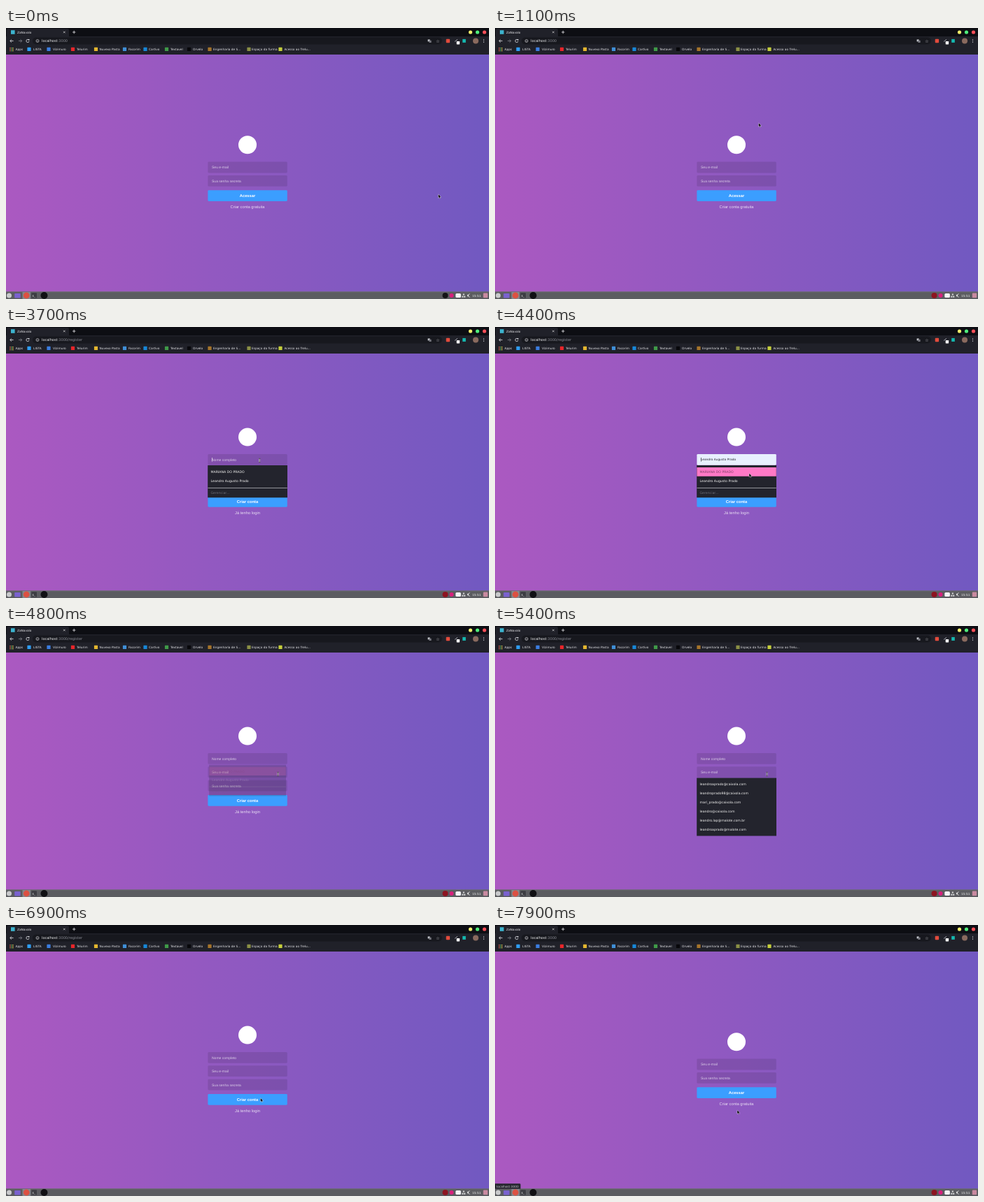
An HTML page with a canvas that plays this animation: 690 by 388 pixels, repeating every 8000 ms.

```html
<!DOCTYPE html>
<html lang="pt-BR">
<head>
<meta charset="utf-8">
<title>Login</title>
<style>
html, body { margin: 0; width: 100%; height: 100%; overflow: hidden; background: #8d59c1; }
canvas { display: block; }
</style>
</head>
<body>
<canvas id="stage" width="690" height="388"></canvas>
<script>
const ctx = document.getElementById('stage').getContext('2d');
const UI = '"DejaVu Sans", sans-serif', PAGE = '"Liberation Sans", Arial, sans-serif';
const LOOP = 8000, STEP = 100;
const REGISTER_AT = 2900, LOGIN_AT = 7800;
const FIELD = { x: 288.4, w: 113.4, h: 15.8, gap: 19.4 };
const PERSON = 'Leandro Augusto Prado';
const EMAILS = ['leandroaprado@caixola.com', 'leandroprado98@caixola.com', 'mari_prado@caixola.com',
  'leandro@caixola.com', 'leandro.lap@malote.com.br', 'leandroaprado@malote.com'];

// time, x, y of the pointer's centre
const PATH = [[0, 619, 241], [200, 619, 241], [1100, 378, 139], [1600, 352, 165], [2500, 356.5, 261],
  [3000, 356.5, 261], [3600, 362, 191], [4000, 364, 191], [4200, 365, 220], [4400, 364.5, 212.5],
  [4700, 388.5, 212], [5500, 388.5, 212], [5700, 388, 228], [6300, 388, 228], [7400, 347.5, 268], [8000, 347.5, 268]];

const BOOKMARKS = [[33, 39, 'LISTA', '#2f9df4'], [61, 67, 'Vizimuro', '#3b7de0'], [95.5, 101, 'Telurim', '#e8262a'],
  [128.5, 133.5, 'Nuvexo Pasta', '#e3b62f'], [169.5, 175, 'Facorim', '#3f8fd8'], [199, 204, 'Cartivo', '#1787d8'],
  [229.5, 235, 'Textavel', '#3f9a48'], [261.5, 267, 'Orvelo', '#08080b'], [291, 296, 'Engenharia de S...', '#a5742b'],
  [347, 351, 'Espaço da Turma', '#8a8f45'], [392, 397.5, 'Acesso ao Trelu...', '#c6cf3c']];

function box(x, y, w, h, color, r = 0) {
  ctx.fillStyle = color;
  ctx.beginPath();
  ctx.roundRect(x, y, w, h, r);
  ctx.fill();
}
function dot(x, y, r, color) {
  ctx.fillStyle = color;
  ctx.beginPath();
  ctx.arc(x, y, r, 0, 7);
  ctx.fill();
}
function line(points, color = '#e4e4e8', width = 0.8) {
  ctx.strokeStyle = color;
  ctx.lineWidth = width;
  ctx.beginPath();
  points.forEach(p => ctx.lineTo(...p));
  ctx.stroke();
}
function text(str, x, y, size, color, font = UI, align = 'left', weight = '') {
  ctx.font = `${weight} ${size}px ${font}`;
  ctx.textAlign = align;
  ctx.fillStyle = color;
  ctx.fillText(str, x, y + size * 0.36);
}

function pointerAt(t) {
  const i = PATH.findIndex((p, n) => n && t <= p[0]);
  const [t0, x0, y0] = PATH[i - 1], [t1, x1, y1] = PATH[i];
  const k = (t - t0) / (t1 - t0), e = k * k * (3 - 2 * k);
  return { x: x0 + (x1 - x0) * e, y: y0 + (y1 - y0) * e };
}
function over(p, x, y, w, h) {
  return p.x >= x && p.x <= x + w && p.y >= y && p.y <= y + h;
}

function drawBrowser(registering) {
  box(0, 0, 690, 38, '#202129');
  box(0, 0, 690, 12, '#0d0e13');
  box(1, 1, 89, 12, '#202129', [2, 2, 0, 0]);
  box(7, 3.2, 5.6, 5.6, '#3db4cf');
  text('ZaNavalo', 16, 6, 4.31, '#e8e8ec');
  line([[82, 4.7], [84.6, 7.3]], '#ddd', 0.7);
  line([[84.6, 4.7], [82, 7.3]], '#ddd', 0.7);
  line([[95, 6], [99.4, 6]]);
  line([[97.2, 3.8], [97.2, 8.2]]);
  ['#f7f36b', '#4ff07b', '#ff4f58'].forEach((c, i) => dot(663.5 + i * 10, 6, 2.6, c));

  line([[10.6, 18.5], [6, 18.5]]);
  line([[8, 16.3], [5.8, 18.5], [8, 20.7]]);
  line([[18, 18.5], [22.6, 18.5]], '#85868e');
  line([[20.6, 16.3], [22.8, 18.5], [20.6, 20.7]], '#85868e');
  ctx.strokeStyle = '#e4e4e8';
  ctx.beginPath();
  ctx.arc(31, 18.5, 2.1, 0.2, 5.4);
  ctx.stroke();
  box(31.8, 16, 1.6, 1.6, '#e4e4e8');

  box(38, 13.5, 585, 10, '#17181e', 5);
  ctx.lineWidth = 0.6;
  ctx.beginPath();
  ctx.arc(45, 18.5, 2, 0, 7);
  ctx.stroke();
  line([[45, 18], [45, 19.6]], '#e4e4e8', 0.6);
  text('localhost', 51, 18.5, 5.03, '#f2f2f4');
  text(':3000' + (registering ? '/register' : ''), 73.6, 18.5, 5.03, '#8c8d96');

  box(602.6, 16.4, 3, 3, '#c9cad0');
  box(604.4, 17.8, 3.2, 3.2, '#75767e');
  text('☆', 617, 18.4, 6, '#d8d8dd', UI, 'center');
  box(628.7, 15.8, 5.4, 5.4, '#e24b3c', 1);
  line([[641, 19.5], [645, 16.3]], '#9ea0a8', 1);
  box(643.7, 19, 4.4, 4.4, '#fff', 0.6);
  box(652.2, 15.9, 4.6, 5, '#15b9b0');
  dot(671, 18.5, 4, '#8a6a5e');
  [-2, 0, 2].forEach(d => dot(682.5, 18.5 + d, 0.6, '#e4e4e8'));

  for (let i = 0; i < 9; i++)
    box(5.3 + i % 3 * 2, 28 + Math.floor(i / 3) * 2, 1.3, 1.3, ['#e8584c', '#52b36a', '#e4c14b'][i % 3]);
  text('Apps', 13.5, 30.5, 4.31, '#e4e4e8');
  for (const [icon, x, label, color] of BOOKMARKS) {
    box(icon - 2.6, 27.8, 5.2, 5.2, color, 0.6);
    text(label, x, 30.5, 4.31, '#e4e4e8');
  }
}

function drawTaskbar(recording) {
  box(0, 377.5, 690, 10.5, '#5b5c60');
  box(0, 377.5, 690, 0.7, '#707175');
  dot(4.5, 383, 3.5, '#c9cacc');
  box(12.2, 380, 8.5, 6.5, '#7a62cf', 0.8);
  box(23.5, 378, 11.5, 10, '#85868a');
  dot(29.2, 383, 4.4, '#dc5142');
  box(36.5, 379.2, 7.5, 7.5, '#3c3d42', 0.8);
  text('$_', 37.5, 383.3, 4, '#e6e6e6');
  dot(54.5, 383, 5, '#101013');
  dot(627.5, 383, 4, recording ? '#8d1420' : '#141416');
  dot(636.5, 383, 3, '#d8207c');
  box(642.3, 380, 7.6, 6, '#f4f4f6', 1.5);
  box(652.8, 380.5, 2, 2, '#ddd');
  box(651.4, 383.7, 2, 2, '#ddd');
  box(654.2, 383.7, 2, 2, '#ddd');
  box(659, 381.8, 1.6, 2.4, '#ddd');
  line([[662.6, 380.6], [660.6, 381.8], [660.6, 384.2], [662.6, 385.4]], '#ddd', 0.9);
  text('15:51', 666, 383, 4.31, '#f0f0f0');
  box(681.8, 379.6, 6.4, 6.6, '#c98aa0', 0.8);
}

function drawForm(t, pointer, registering) {
  const labels = ['Seu e-mail', 'Sua senha secreta'];
  if (registering) labels.unshift('Nome completo');
  const top = registering ? 181.9 : 191.6;
  const preview = registering && t >= 4200 && t < 4750;
  dot(345, top - 24.3, 13, '#fff');
  labels.forEach((label, i) => {
    const y = top + i * FIELD.gap, filled = preview && i === 0;
    box(FIELD.x, y, FIELD.w, FIELD.h, filled ? '#e8f0fe' : 'rgba(0,0,0,.1)', 1.4);
    if (filled) text(PERSON, 294, y + 8, 4.31, '#22242c');
    else text(label, 294, y + 8, 5.03, 'rgba(255,255,255,.7)', PAGE);
  });
  if (registering && t >= 3700 && t < 4700) box(294, top + 5.2, 0.6, 5.6, preview ? '#222' : '#fff');

  const buttonY = top + labels.length * FIELD.gap + 1.8;
  const [button, link, half] = registering ? ['Criar conta', 'Já tenho login', 18] : ['Acessar', 'Criar conta gratuita', 25];
  box(FIELD.x, buttonY, FIELD.w, FIELD.h, '#3b9eff', 1.4);
  text(button, 345, buttonY + 7.8, 5.75, '#fff', PAGE, 'center', 'bold');
  const hover = over(pointer, 345 - half, buttonY + 20.5, half * 2, 8.8);
  text(link, 345, buttonY + 24.1, 5.75, hover ? '#fff' : 'rgba(255,255,255,.8)', PAGE, 'center');
}

// Popup that shrinks a little while it fades out.
function popup(t, open, close, y, h, paint) {
  if (t < open || t >= close + 125) return;
  const p = Math.max(0, (t - close) / 125), s = 1 - 0.035 * Math.min(1, 2 * p);
  ctx.save();
  ctx.globalAlpha = 1 - p;
  ctx.translate(345, y + h / 2);
  ctx.scale(s, s);
  ctx.translate(-345, -y - h / 2);
  box(FIELD.x - 0.2, y, FIELD.w + 0.4, h, '#23242d');
  paint(y);
  ctx.restore();
}

function drawPopups(t, pointer) {
  popup(t, 3700, 4700, 198, 46.3, y => {
    ['MARIANA DO PRADO', PERSON].forEach((name, i) => {
      const rowY = y + 3 + i * 12.9, hover = over(pointer, FIELD.x, rowY, FIELD.w, 12.8);
      if (hover) box(FIELD.x, rowY, FIELD.w, 12.8, '#ff79c6');
      text(name, 292.5, rowY + 6.4, 4.67, hover ? '#7c3f67' : '#f4f4f2');
    });
    box(FIELD.x, y + 32, FIELD.w, 0.8, '#b9bac0');
    text('Gerenciar...', 292.5, y + 39.2, 4.67, '#6d6e77');
  });
  popup(t, 5000, 5738, 217.5, 83, y =>
    EMAILS.forEach((mail, i) => text(mail, 292.5, y + 9.3 + i * 12.9, 4.67, '#f4f4f2')));
}

function drawStatus(t) {
  const path = t >= 2400 && t < 3100 ? '/register' : t >= 7600 ? '' : null;
  if (path === null) return;
  box(0, 370.3, path ? 54 : 36.5, 7.4, '#25262e', [0, 1.4, 0, 0]);
  text('localhost:3000' + path, 2, 374, 4.31, '#c4c5cb');
}

function drawPointer(t, { x, y }) {
  const beam = (t >= 3500 && t < 4100) || (t >= 4700 && t < 6600);
  if (beam) {
    line([[x, y - 2.8], [x, y + 2.8]], '#fff', 1.6);
    line([[x - 1.2, y - 2.6], [x + 1.2, y - 2.6]], '#222', 0.6);
    line([[x, y - 2.6], [x, y + 2.6]], '#222', 0.7);
    line([[x - 1.2, y + 2.6], [x + 1.2, y + 2.6]], '#222', 0.6);
    return;
  }
  ctx.beginPath();
  [[0, 0], [0, 4.9], [1.2, 3.8], [2, 5.6], [2.8, 5.2], [2, 3.5], [3.6, 3.5]]
    .forEach(([dx, dy]) => ctx.lineTo(x - 1.3 + dx, y - 2.7 + dy));
  ctx.closePath();
  ctx.strokeStyle = 'rgba(255,255,255,.75)';
  ctx.lineWidth = 0.9;
  ctx.stroke();
  ctx.fillStyle = '#111';
  ctx.fill();
}

const wall = ctx.createLinearGradient(0, 0, 690, 0);
wall.addColorStop(0, '#ab59c1');
wall.addColorStop(1, '#7159c1');

function frame() {
  const t = Math.floor(performance.now() % LOOP / STEP) * STEP;
  const registering = t >= REGISTER_AT && t < LOGIN_AT;
  const pointer = pointerAt(t);
  ctx.textRendering = 'geometricPrecision';
  box(0, 0, 690, 388, wall);
  drawBrowser(registering);
  drawForm(t, pointer, registering);
  drawPopups(t, pointer);
  drawTaskbar(t >= 500);
  drawStatus(t);
  drawPointer(t, pointer);
  requestAnimationFrame(frame);
}
frame();
</script>
</body>
</html>
```
